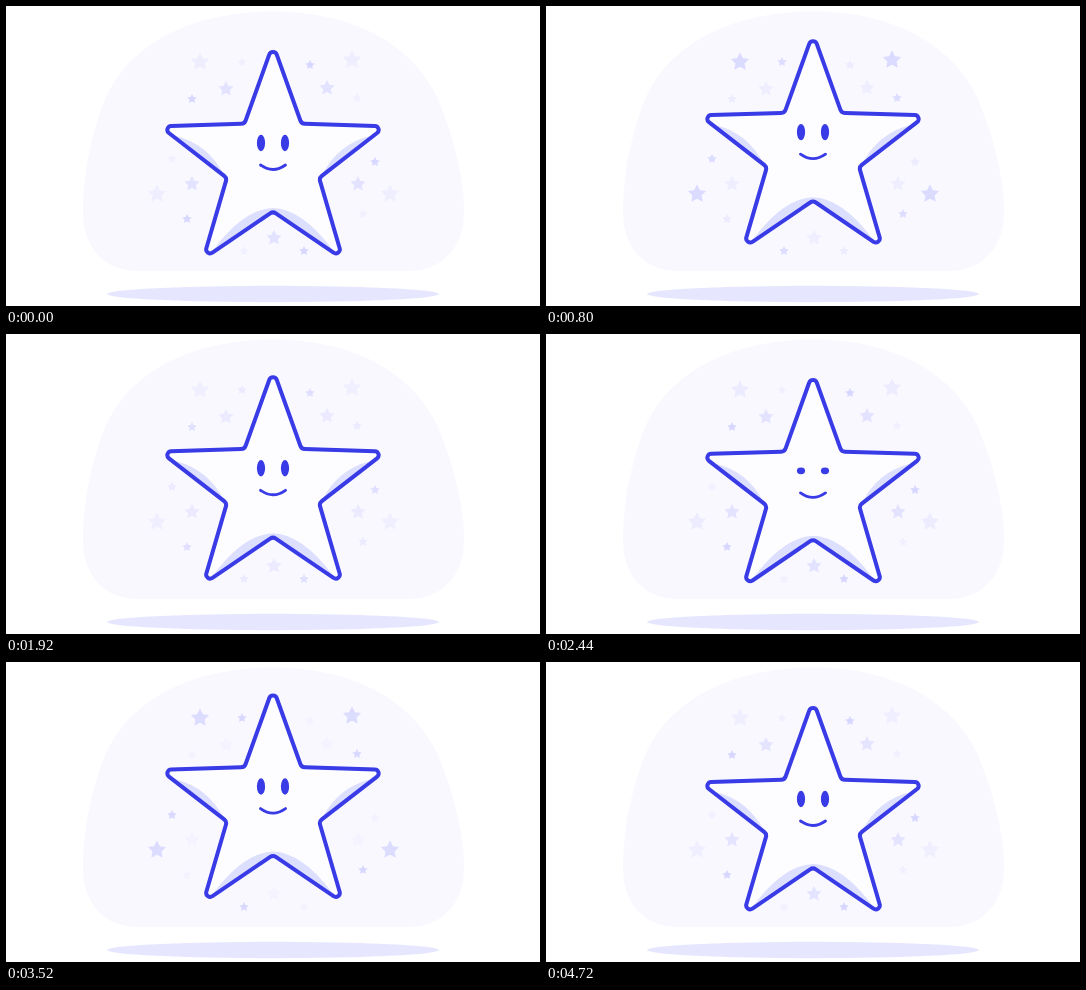
Recreate the animation shown at these times as an HTML page. Size 534 by 300 pixels, loop 4.74 s.

```html
<!DOCTYPE html>
<html lang="en">
<head>
<meta charset="utf-8">
<title>Floating star</title>
<style>
html, body { margin: 0; width: 100%; height: 100%; overflow: hidden; background: #fff; }
svg { display: block; width: 100vw; height: 100vh; }
</style>
</head>
<body>
<svg viewBox="0 0 534 300">
  <path fill="#f9f8ff" d="M267 5.5C352 5.5 410 42 433 96C447 130 458 170 458 206C458 242 436 265 402 265H132C98 265 77 242 77 206C77 170 84 132 98 96C119 42 180 5.5 267 5.5Z"/>
  <ellipse cx="267" cy="288" rx="166" ry="8.2" fill="#e6e7ff"/>
  <g id="sparkles" fill="#6c6cff"></g>
  <g id="hero">
    <path class="body" fill="#fdfdff"/>
    <g fill="#dddfff">
      <path d="M170 130Q202 138 218 169Z"/>
      <path d="M364 130Q332 138 316 169Z"/>
      <path d="M208 243Q238 203 267 202Q296 203 326 243L267 206Z"/>
    </g>
    <path class="body" fill="none" stroke="#393be6" stroke-width="4"/>
    <g fill="#393be6">
      <ellipse class="eye" cx="255" cy="137" rx="4.1"/>
      <ellipse class="eye" cx="279" cy="137" rx="4.1"/>
    </g>
    <path d="M254.5 159Q267 168 279.5 159" fill="none" stroke="#393be6" stroke-width="2.8" stroke-linecap="round"/>
  </g>
</svg>
<script>
const LOOP = 4740, CYCLE = LOOP / 2, RISE = 12.5;
const hero = document.getElementById("hero");
const sparkles = document.getElementById("sparkles");
const eyes = document.querySelectorAll(".eye");

// Five-pointed star; tips and notches are rounded by the given radii
function starPath(cx, cy, outer, inner, tip, notch) {
  const point = i => {
    const a = i * Math.PI / 5, r = i % 2 ? inner : outer;
    return [cx + r * Math.sin(a), cy - r * Math.cos(a)];
  };
  const toward = ([x, y], [u, v], d) => {
    const k = d / Math.hypot(u - x, v - y);
    return `${(x + (u - x) * k).toFixed(2)} ${(y + (v - y) * k).toFixed(2)}`;
  };
  const tipHalf = Math.atan2(inner * Math.sin(Math.PI / 5), outer - inner * Math.cos(Math.PI / 5));
  let d = "";
  for (let i = 0; i < 10; i++) {
    const odd = i % 2, r = odd ? notch : tip;
    const cut = r / Math.tan(tipHalf + odd * Math.PI / 5);
    const p = point(i);
    d += `${i ? "L" : "M"}${toward(p, point(i - 1), cut)}A${r} ${r} 0 0 ${1 - odd} ${toward(p, point(i + 1), cut)}`;
  }
  return d + "Z";
}

document.querySelectorAll(".body").forEach(e =>
  e.setAttribute("d", starPath(267, 156.9, 118.7, 48.5, 4, 5)));

// Each group glows from low to low + gain, brightest at peak
const groups = [
  { r: 9.6, low: 0.05, gain: 0.17, peak: 900,
    at: [[194, 56], [346, 54], [151, 188], [384, 188]] },
  { r: 5, low: 0.05, gain: 0.18, peak: 1150,
    at: [[236, 56], [351, 92], [166, 153], [357, 208], [238, 245]] },
  { r: 8, low: 0.03, gain: 0.12, peak: 100,
    at: [[220, 83], [321, 82], [186, 178], [352, 178], [268, 232]] },
  { r: 5, low: 0.04, gain: 0.2, peak: 0,
    at: [[304, 59], [186, 93], [369, 156], [181, 213], [298, 245]] }
];

for (const g of groups) {
  g.el = document.createElementNS("http://www.w3.org/2000/svg", "path");
  g.el.setAttribute("d", g.at.map(([x, y]) => starPath(x, y, g.r, g.r / 2, 0.2, 0.2)).join(""));
  sparkles.appendChild(g.el);
}

const clamp = v => Math.max(0, Math.min(1, v));
const ease = v => (1 - Math.cos(Math.PI * clamp(v))) / 2;
const pulse = t => (1 + Math.cos(2 * Math.PI * t / CYCLE)) / 2;

function lift(t) {
  const p = t % CYCLE;
  return RISE * (ease(p / 1050) - ease((p - 1100) / 1190));
}

function draw(t) {
  hero.setAttribute("transform", `translate(0 ${-lift(t).toFixed(3)})`);
  const open = 0.1 + 0.9 * clamp(Math.abs(t - 2400) / 120);
  eyes.forEach(e => e.setAttribute("ry", 8.2 * open));
  for (const g of groups) g.el.setAttribute("opacity", g.low + g.gain * pulse(t - g.peak));
}

const start = performance.now();
function tick() {
  draw((performance.now() - start) % LOOP);
  requestAnimationFrame(tick);
}
draw(0);
requestAnimationFrame(tick);
</script>
</body>
</html>
```
